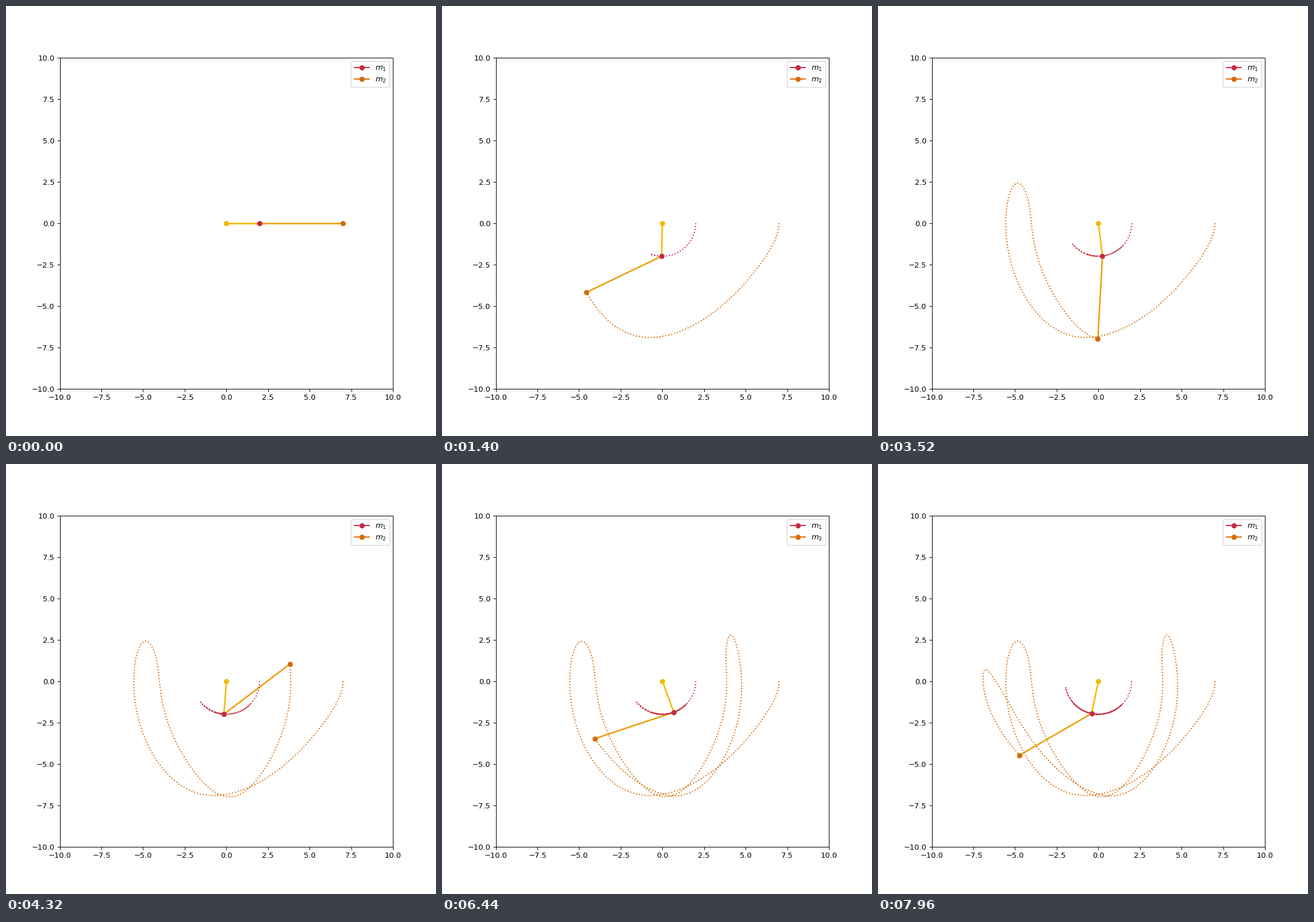
These frames come from a looping animation (748x748 px, 8 s). A matplotlib script:

```python
import numpy as np
import matplotlib.pyplot as plt
from matplotlib.animation import FuncAnimation

FRAMES, INTERVAL = 200, 40
G, L1, L2 = 9.81, 2.0, 5.0
CRIMSON, RUST, AMBER, YELLOW = "#C72C41", "#D76A03", "#EC9F05", "#F5BB00"

# Poses the swing passes through: step -> (x1, x2, y2)
POSES = {
    35: (-0.06, -4.55, -4.16),
    61: (-1.255, -4.55, 2.20),
    88: (0.264, -0.03, -6.98),
    131: (0.935, 4.56, 1.645),
    161: (0.68, -4.066, -3.48),
    199: (-0.41, -4.74, -4.485),
}


def slope(state, ratio):
    """Double pendulum; ratio is m1 / m2, angles are from straight down."""
    a, b, wa, wb = state
    sin_d, cos_d = np.sin(a - b), np.cos(a - b)
    mass = 2 * (ratio + 1 - cos_d**2)
    pull_a, pull_b = wa**2 * L1, wb**2 * L2
    acc_a = (-G * (2 * ratio + 1) * np.sin(a) - G * np.sin(a - 2 * b)
             - 2 * sin_d * (pull_b + pull_a * cos_d)) / (L1 * mass)
    acc_b = 2 * sin_d * ((ratio + 1) * (pull_a + G * np.cos(a))
                         + pull_b * cos_d) / (L2 * mass)
    return np.array([wa, wb, acc_a, acc_b])


def swing(ratio, dt, substeps=2):
    """Runge-Kutta run from rest with both rods level: x1, y1, x2, y2 per step."""
    ratio, dt = np.asarray(ratio, float), np.asarray(dt, float)
    h = dt / substeps
    state = np.zeros((4,) + ratio.shape)
    state[:2] = np.pi / 2
    angles = [state[:2]]
    for _ in range(FRAMES - 1):
        for _ in range(substeps):
            k1 = slope(state, ratio)
            k2 = slope(state + h / 2 * k1, ratio)
            k3 = slope(state + h / 2 * k2, ratio)
            k4 = slope(state + h * k3, ratio)
            state = state + h / 6 * (k1 + 2 * k2 + 2 * k3 + k4)
        angles.append(state[:2])
    a, b = np.moveaxis(np.array(angles), 1, 0)
    x1, y1 = L1 * np.sin(a), -L1 * np.cos(a)
    return x1, y1, x1 + L2 * np.sin(b), y1 - L2 * np.cos(b)


def calibrate():
    """Mass ratio and time step that best meet POSES, by a zooming grid search."""
    ratio, dt, d_ratio, d_dt = 2.5, 0.054, 1.0, 0.007
    for n in (61, 15, 15, 15, 15):
        grid_r, grid_t = np.meshgrid(
            np.linspace(ratio - d_ratio, ratio + d_ratio, n),
            np.linspace(dt - d_dt, dt + d_dt, n))
        x1, _, x2, y2 = swing(grid_r, grid_t)
        error = sum(abs(x1[i] - p) + abs(x2[i] - q) + abs(y2[i] - s)
                    for i, (p, q, s) in POSES.items())
        best = np.argmin(error)
        ratio, dt = grid_r.flat[best], grid_t.flat[best]
        d_ratio *= 4 / (n - 1)
        d_dt *= 4 / (n - 1)
    return ratio, dt


x1, y1, x2, y2 = swing(*calibrate(), substeps=8)

fig, ax = plt.subplots(figsize=(8, 8), dpi=93.5)
ax.set(xlim=(-10, 10), ylim=(-10, 10))

rod1, = ax.plot([], [], color=YELLOW, lw=2)
rod2, = ax.plot([], [], color=AMBER, lw=2)
trail1, = ax.plot([], [], ":", color=CRIMSON)
trail2, = ax.plot([], [], ":", color=RUST)
ax.plot([0], [0], "o", color=YELLOW)
bob1, = ax.plot([], [], "o-", color=CRIMSON, label="$m_1$")
bob2, = ax.plot([], [], "o-", color=RUST, label="$m_2$")
ax.legend(loc="upper right")


def update(i):
    rod1.set_data([0, x1[i]], [0, y1[i]])
    rod2.set_data([x1[i], x2[i]], [y1[i], y2[i]])
    trail1.set_data(x1[:i + 1], y1[:i + 1])
    trail2.set_data(x2[:i + 1], y2[:i + 1])
    bob1.set_data([x1[i]], [y1[i]])
    bob2.set_data([x2[i]], [y2[i]])
    return rod1, rod2, trail1, trail2, bob1, bob2


anim = FuncAnimation(fig, update, frames=FRAMES, interval=INTERVAL,
                     repeat=True, repeat_delay=0)
plt.show()
```
